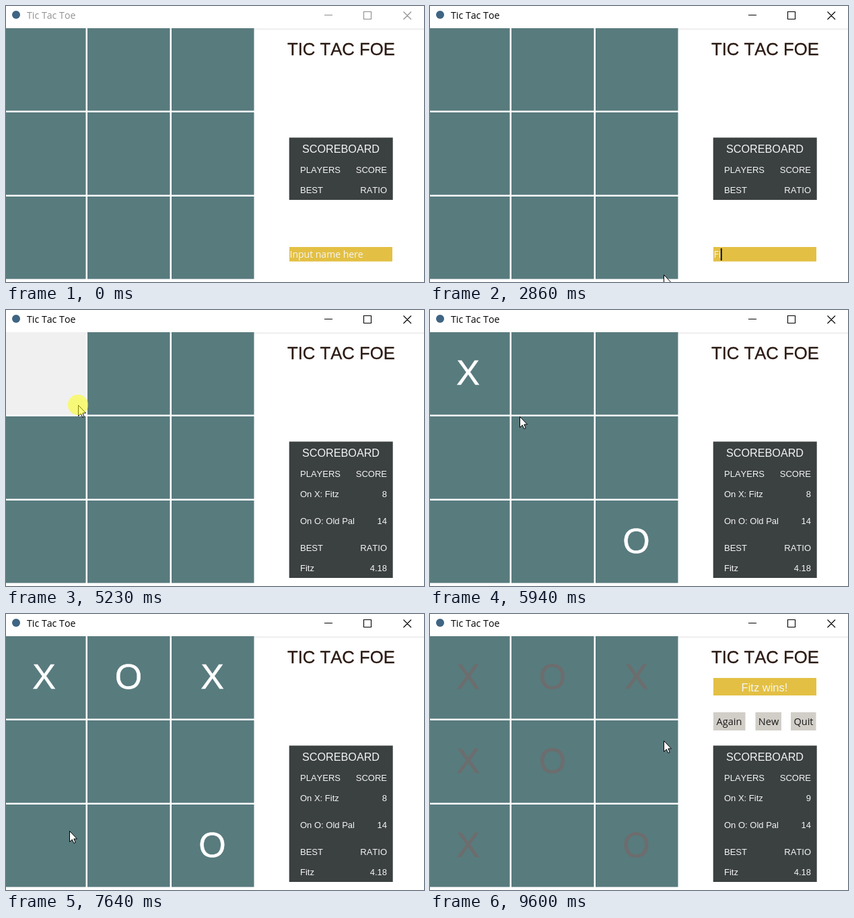
Recreate the animation shown at these times as an HTML page. Size 621 px wide and 410 px high, loop 9.67 s.

```html
<!DOCTYPE html>
<html lang="en">
<head>
<meta charset="utf-8">
<title>Tic Tac Toe</title>
<style>
  html, body { margin: 0; width: 100%; height: 100%; overflow: hidden; background: #fff; }
  svg { display: block; width: 621px; height: 410px; font: 13px "Liberation Sans", Arial, sans-serif; font-kerning: none; }
  .ui { font-family: "Open Sans", "Noto Sans", sans-serif; }
  .light { fill: #f5f5f5; }
  .end { text-anchor: end; }
  .mid { text-anchor: middle; }
  .cell { fill: #587b7e; }
  .cell.lit { fill: #f0f0f0; }
  .mark { font-size: 52px; fill: #fff; stroke: #fff; stroke-width: .5; text-anchor: middle; }
  .over .mark { fill: #6d6d6d; stroke: #6d6d6d; }
  .heading { font-size: 25.7px; fill: #2b1a12; stroke: #2b1a12; stroke-width: .3; }
  .chrome path { fill: none; stroke: #000; stroke-width: 1.1; }
  .idle text { fill: #929292; }
  .idle path { stroke: #8c8c8c; }
</style>
</head>
<body>
<svg viewBox="0 0 621 410">
  <rect width="621" height="410" fill="#fff"/>
  <rect y="33" width="621" height="2.5" fill="#f0f0f0"/>
  <circle cx="15" cy="13" r="6" fill="#3f6583"/>
  <g id="chrome" class="chrome">
    <text class="ui" x="31" y="19" font-size="14.2">Tic Tac Toe</text>
    <path d="M473 13.5h12M531.5 8.5h11v11h-11zM590.5 8.5l11.5 11.5M602 8.5L590.5 20"/>
  </g>

  <g id="board"></g>

  <text class="heading" x="418" y="73">TIC TAC FOE</text>

  <g id="result">
    <rect x="421" y="95" width="153" height="26" fill="#e3c044"/>
    <text class="light mid" x="497" y="114.5" font-size="16.5">Fitz wins!</text>
    <g fill="#d1cec8">
      <rect x="421" y="146" width="47.5" height="27"/>
      <rect x="483.5" y="146" width="38.5" height="27"/>
      <rect x="536" y="146" width="37.5" height="27"/>
    </g>
    <g class="ui mid" font-size="14.5" fill="#1a1a1a">
      <text x="444.5" y="164.5">Again</text>
      <text x="503" y="164.5">New</text>
      <text x="555" y="164.5">Quit</text>
    </g>
  </g>

  <rect id="panel" x="420.7" y="195.5" width="154" fill="#3b4041"/>
  <g class="light">
    <text class="mid" x="497.5" y="218" font-size="16.2">SCOREBOARD</text>
    <text x="437" y="248">PLAYERS</text>
    <text class="end" x="566" y="248">SCORE</text>
    <g id="players">
      <text x="437" y="278">On X: Fitz</text>
      <text class="end" x="566" y="278" id="score">8</text>
      <text x="437" y="318">On O: Old Pal</text>
      <text class="end" x="566" y="318">14</text>
      <text x="437" y="388">Fitz</text>
      <text class="end" x="566" y="388">4.18</text>
    </g>
    <g id="best">
      <text x="437" y="278">BEST</text>
      <text class="end" x="566" y="278">RATIO</text>
    </g>
  </g>

  <g id="entry">
    <rect x="421" y="358" width="153" height="21.5" fill="#e3c044"/>
    <rect id="selection" y="360" height="18" fill="#0078d7"/>
    <text id="field" class="ui light" x="421.5" y="374" font-size="14"></text>
    <rect id="caret" y="360" width="2" height="18" fill="#111"/>
  </g>

  <g id="pointer">
    <path id="arrow" fill="#fff" stroke="#000" d="M.5.5V16.5L4.3 13L6.8 18.5L9.2 17.5L6.8 12H11.5Z"/>
    <path id="beam" fill="none" stroke="#222" d="M-3-7.5H-1L0-6.5L1-7.5H3M0-6.5V6.5M-3 7.5H-1L0 6.5L1 7.5H3"/>
    <circle id="halo" r="15.2" fill="#ff0" fill-opacity=".5"/>
  </g>
</svg>

<script>
const LOOP = 9670;
const PROMPT = "Input name here";
const SVG_NS = "http://www.w3.org/2000/svg";
const $ = id => document.getElementById(id);
const show = (id, on) => { $(id).style.display = on ? "" : "none"; };
const within = (t, [a, b]) => t >= a && t < b;

// first step, last step, steps, x, y, bow in x, bow in y
const moves = [
  [350, 810, 7, 532, 371, 0, 0],
  [1360, 1360, 1, 540, 371, 0, 0],
  [1430, 1580, 3, 347, 399, 0, 0],
  [4460, 4610, 3, 120, 158, 0, 0],
  [4840, 4930, 2, 107, 141, 0, 0],
  [5790, 6403, 9, 312, 99, 0, 32],
  [6860, 7564, 10, 94, 322, 0, 0],
  [8330, 8640, 5, 91, 219, -2, 0],
  [9440, 9600, 3, 347, 188, 0, 0]
];

// press, release, cell
const drag = [1190, 1650];
const clicks = [[5230, 5410, 0], [6480, 6630, 2], [7642, 7800, 6], [8810, 8900, 3]];

// cell, sign, time
const marks = [
  [0, "X", 5410], [8, "O", 5410], [2, "X", 6630], [1, "O", 6630],
  [6, "X", 7800], [4, "O", 7800], [3, "X", 8900]
];
const typed = [[2620, ""], [2690, "F"], [2860, "Fi"], [2943, "Fit"], [3110, "Fitz"]];
const SUBMIT = 3520, WIN = 8900;

function add(name, attrs, text = "") {
  const node = document.createElementNS(SVG_NS, name);
  for (const key in attrs) node.setAttribute(key, attrs[key]);
  node.textContent = text;
  return $("board").appendChild(node);
}

const columns = [[0, 118.5], [121, 122.5], [246, 122.5]];
const cells = Array.from({ length: 9 }, (_, i) => {
  const [x, width] = columns[i % 3];
  return add("rect", { class: "cell", x, y: 33 + 125 * Math.floor(i / 3), width, height: 122.5 });
});
const signs = marks.map(([cell, sign]) => add("text", {
  class: "mark",
  x: [56.5, 182, 306.5][cell % 3],
  y: 110.5 + 125 * Math.floor(cell / 3)
}, sign));

function pointerAt(t) {
  let x = 536, y = 412;
  for (const [start, end, steps, toX, toY, bowX, bowY] of moves) {
    if (t < start) break;
    const gap = (end - start) / (steps - 1) || 1;
    const p = Math.min(steps, Math.floor((t - start) / gap + 1e-6) + 1) / steps;
    const eased = p * p * (3 - 2 * p), bow = 4 * p * (1 - p);
    x += (toX - x) * eased + bowX * bow;
    y += (toY - y) * eased + bowY * bow;
  }
  return [Math.round(x), Math.round(y)];
}

function drawEntry(t, pointerX) {
  const field = $("field"), left = 421;
  let text = PROMPT;
  for (const [at, value] of typed) if (t >= at) text = value;
  if (field.textContent !== text) field.textContent = text;

  const end = text ? field.getComputedTextLength() : 0;
  const selecting = t >= drag[0] && text === PROMPT;
  let edge = end;
  if (selecting) {
    let count = 0;
    while (count < text.length && field.getStartPositionOfChar(count).x < pointerX) count++;
    edge = count ? field.getSubStringLength(0, count) : 0;
  }
  $("selection").setAttribute("x", left + edge);
  $("selection").setAttribute("width", selecting ? Math.max(0, end - edge) : 0);
  $("caret").setAttribute("x", left + edge);
  show("caret", t >= drag[0] && !within(t, [1820, 2140]));
}

function draw(t) {
  const [x, y] = pointerAt(t);
  const dragging = within(t, drag);
  const pressed = clicks.find(click => within(t, click));
  const playing = t >= SUBMIT, won = t >= WIN;

  $("chrome").classList.toggle("idle", t < drag[0]);
  $("board").classList.toggle("over", won);
  cells.forEach((cell, i) => cell.classList.toggle("lit", !!pressed && pressed[2] === i));
  signs.forEach((sign, i) => { sign.style.display = t >= marks[i][2] ? "" : "none"; });

  show("result", won);
  show("players", playing);
  $("panel").setAttribute("height", playing ? 202.5 : 92.5);
  $("best").setAttribute("transform", `translate(0 ${playing ? 80 : 0})`);
  $("score").textContent = won ? 9 : 8;

  show("entry", !playing);
  if (!playing) drawEntry(t, x);

  const overEntry = t < drag[0] && y < 379;
  show("pointer", t >= 350);
  show("halo", dragging || !!pressed);
  show("beam", dragging || overEntry);
  show("arrow", !(dragging || overEntry));
  $("pointer").setAttribute("transform", `translate(${x} ${y})`);
}

const begin = performance.now();
function tick() {
  draw((performance.now() - begin) % LOOP);
  requestAnimationFrame(tick);
}
tick();
</script>
</body>
</html>
```
